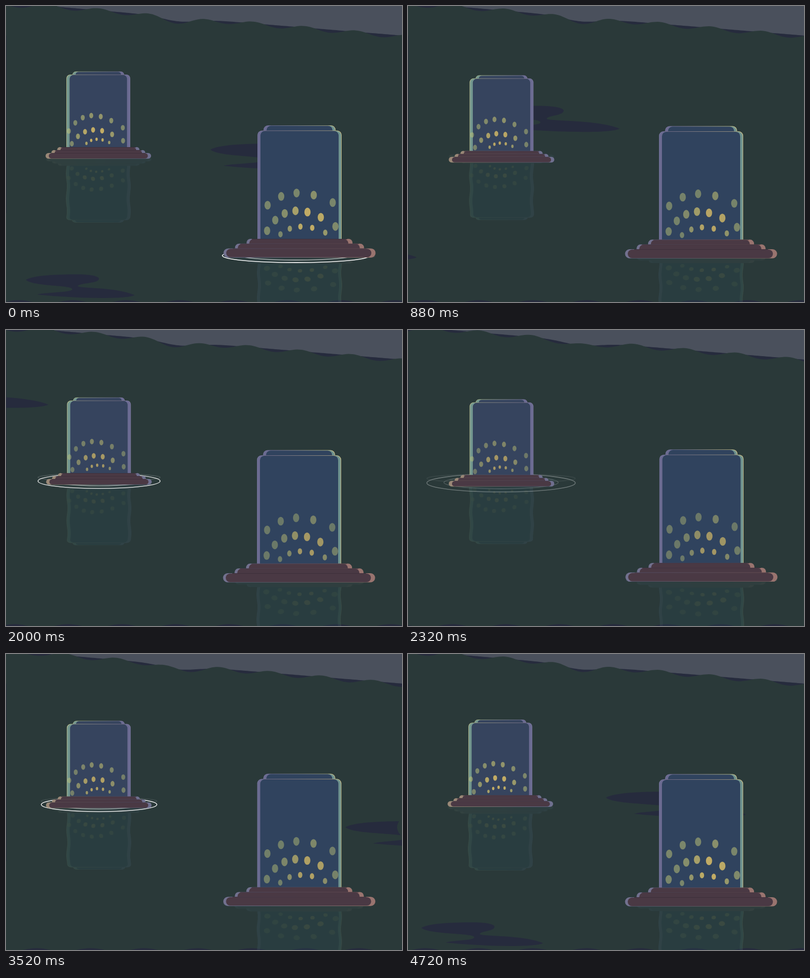
An HTML page with a canvas for the animation above (4800 ms loop, 800 px wide and 600 px high).

```html
<!DOCTYPE html>
<html lang="en">
<head>
<meta charset="utf-8">
<title>Floating lanterns</title>
<style>
  html, body { margin: 0; width: 100%; height: 100%; overflow: hidden; background: #262b3d; }
  canvas { display: block; width: 800px; height: 600px; }
</style>
</head>
<body>
<canvas id="stage" width="800" height="600"></canvas>
<script>
const LOOP = 4800, STEP = 80, TAU = Math.PI * 2;
const NIGHT = '#262b3d', LAKE = '#2a3939', SKY = '#4a505c', WOOD = '#4a3944';
const ctx = document.getElementById('stage').getContext('2d');
const mirror = document.createElement('canvas');
mirror.width = 800;
mirror.height = 600;
const mctx = mirror.getContext('2d');

const LANTERNS = [
  {
    x: 186.5, half: 64.5, top: 139, inset: 6.5, round: 8, glass: '#36445e',
    cap: { half: 52.5, h: 6.2 },
    foot: { half: 83, grow: 11.8, y: 286, rise: 6, thick: 11.5, ends: [6.5, 6.5] },
    rim: ['#73978f', '#6b6b92'], edge: ['#b4ba8c', '#77759a'],
    wood: ['#9a8877', '#6f708f'],
    arcs: [
      { n: 7, from: 127, to: 236, y: 222, drop: 28, size: 4 },
      { n: 7, from: 133, to: 236.5, y: 251, drop: 25, size: 4 },
      { n: 5, from: 162.5, to: 208.5, y: 270, drop: 7.5, size: 2.4 }
    ],
    glow: { x: 181, y: 259, reach: 46 },
    bob: { period: 1600, dx: 2.5, dy: 8 },
    mirror: { axis: 538.5, squash: .75 },
    ring: { x: 188, y: 303.3, r: 103.5, flat: .122, start: 160, period: 1600, life: 700, speed: .083 }
  },
  {
    x: 593, half: 85, top: 252.5, inset: 6, round: 9, glass: '#30435e',
    cap: { half: 72.7, h: 10.5 },
    foot: { half: 107, grow: 23.3, y: 472, rise: 9.7, thick: 18.5, ends: [5.5, 8.5] },
    rim: ['#6b6b91', '#6f938f'], edge: ['#73739a', '#cbc08a'],
    wood: ['#72718f', '#99746f'],
    arcs: [
      { n: 5, from: 528.5, to: 660, y: 379, drop: 22, size: 6.3 },
      { n: 7, from: 527.5, to: 665.5, y: 415, drop: 36, size: 6.3 },
      { n: 5, from: 554.5, to: 645, y: 447, drop: 14, size: 4.4 }
    ],
    glow: { x: 613, y: 432, reach: 58 },
    bob: { period: 1120, dx: -2.4, dy: 4.1 },
    mirror: { axis: 793.75, squash: .575 },
    ring: { x: 586, y: 506, r: 149, flat: .095, start: 0, period: 1200, life: 600, speed: .088 }
  }
];

const STREAKS = [
  { x: 400, y: 279, sx: 1.15, sy: 1.1 },
  { x: 27, y: 544, sx: 1, sy: 1 }
];

const clamp = v => Math.max(0, Math.min(1, v));
const bobAt = (L, t) => (1 - Math.cos(TAU * t / L.bob.period)) / 2;

function split(c, x, half, [left, right]) {
  const g = c.createLinearGradient(x - half, 0, x + half, 0);
  g.addColorStop(.12, left);
  g.addColorStop(.88, right);
  return g;
}

// A block centred on x with a coloured rim at both ends
function slab(c, x, half, y, h, radii, [l, r], rim, edge, fill) {
  c.beginPath();
  c.roundRect(x - half, y, half * 2, h, radii);
  c.fillStyle = split(c, x, half, edge);
  c.fill();
  c.beginPath();
  c.roundRect(x - half + 1, y + .7, half * 2 - 2, h - 1.2, radii);
  c.fillStyle = split(c, x, half, rim);
  c.fill();
  c.beginPath();
  c.roundRect(x - half + l, y + .8, half * 2 - l - r, h - 1.4, radii);
  c.fillStyle = fill;
  c.fill();
}

function lights(c, L, t) {
  const shimmer = .87 + .1 * Math.cos(TAU * t / LOOP);
  for (const arc of L.arcs) {
    const bend = .06 * arc.n - .08;
    for (let i = 0; i < arc.n; i++) {
      const k = i / (arc.n - 1);
      const x = arc.from + (arc.to - arc.from) * (k - bend * k * (1 - k));
      const y = arc.y + arc.drop * (2 * (k - .53)) ** 2;
      const warm = clamp(1.55 * (1 - Math.hypot(x - L.glow.x, y - L.glow.y) / L.glow.reach));
      c.fillStyle = `rgba(${190 + 14 * warm},${196 - 16 * warm},${119 - 17 * warm},${(.54 + .42 * warm) * shimmer})`;
      c.beginPath();
      c.ellipse(x, y, arc.size, arc.size * 1.4, 0, 0, TAU);
      c.fill();
    }
  }
}

function lantern(c, L, t, footAlpha) {
  const { cap, foot } = L;
  const corners = [L.round, L.round, 0, 0], ends = [L.inset, L.inset];
  slab(c, L.x, cap.half, L.top - cap.h, cap.h + 1, corners, ends, L.rim, L.edge, L.glass);
  slab(c, L.x, L.half, L.top, foot.y - L.top + 1, corners, ends, L.rim, L.edge, L.glass);
  c.fillStyle = 'rgba(110,100,110,.5)';
  c.fillRect(L.x - cap.half, L.top, cap.half * 2, .9);
  lights(c, L, t);

  c.globalAlpha = footAlpha;
  for (let i = 0; i < 3; i++) {
    const h = i < 2 ? foot.rise + 1 : foot.thick, half = foot.half + foot.grow * i;
    const y = foot.y + foot.rise * i, r = h * .75;
    slab(c, L.x, half, y, h, i < 2 ? [r, r, 0, 0] : h / 2, foot.ends, L.wood, L.wood, WOOD);
    c.fillStyle = '#3e303c';
    c.fillRect(L.x - half + h, y, half * 2 - h * 2, 1);
  }
  c.globalAlpha = 1;
}

function reflect(L, t) {
  const b = bobAt(L, t), { axis, squash } = L.mirror;
  mctx.setTransform(1, 0, 0, 1, 0, 0);
  mctx.clearRect(0, 0, 800, 600);
  mctx.setTransform(1, 0, 0, -squash, L.bob.dx * b, axis - .65 * L.bob.dy * b);
  lantern(mctx, L, t, .5);
  // Tint the image with the water
  mctx.setTransform(1, 0, 0, 1, 0, 0);
  mctx.globalCompositeOperation = 'source-atop';
  mctx.fillStyle = 'rgba(30,90,88,.45)';
  mctx.fillRect(0, 0, 800, 600);
  mctx.globalCompositeOperation = 'source-over';

  const from = Math.round(axis - squash * (L.foot.y + 36)) - 8;
  ctx.globalAlpha = .22;
  for (let y = from; y < Math.min(600, from + 170); y += 2) {
    ctx.drawImage(mirror, 0, y, 800, 2, Math.sin(y / 8 + TAU * t / 960), y, 800, 2);
  }
  ctx.globalAlpha = 1;
}

// Sloping shoreline with one soft bulge
const shore = x => Math.max(-1, .0865 * x - 7) + 8.5 * Math.exp(-(((x - 350) / 50) ** 2));

function area(upper, lower) {
  ctx.beginPath();
  for (let x = 0; x <= 800; x += 4) ctx.lineTo(x, upper(x));
  for (let x = 800; x >= 0; x -= 4) ctx.lineTo(x, lower(x));
  ctx.fill();
}

function scenery(t) {
  const turn = t / 960;
  ctx.fillStyle = NIGHT;
  ctx.fillRect(0, 0, 800, 600);
  ctx.fillStyle = SKY;
  area(() => -5, x => shore(x) - .5 - Math.max(0, (x - 400) / 220));
  ctx.fillStyle = LAKE;
  area(x => shore(x) - 4.6 * Math.cos(TAU * ((x - 187) / 104 + turn)),
    x => 599.7 - 3.4 * Math.cos(TAU * ((x - 26) / 108.5 + turn)));
  ctx.fillStyle = NIGHT;
  ctx.fillRect(0, 60, .8, 360);
}

function streak(S, t) {
  // Slow drift up to the loop's end, then a faster one with the lobes sliding apart
  const fast = t < LOOP / 2, left = 4720 - t;
  const x = S.x + (fast ? 13 - .305 * t : .238 * left);
  const y = S.y + (fast ? -.087 * t : .05 * left);
  const d = fast ? -26 * clamp(1 - t / 880) : 0, n = d / 2;
  const side = j => 10 * Math.cos((j - 12) / 40 * Math.PI);
  ctx.save();
  // The pond's swaying sides trim the streak
  ctx.beginPath();
  for (let j = -4; j <= 64; j += 4) ctx.lineTo(side(j), y + j);
  for (let j = 64; j >= -4; j -= 4) ctx.lineTo(800 - side(j), y + j);
  ctx.clip();
  ctx.translate(x, y);
  ctx.scale(S.sx, S.sy);
  ctx.beginPath();
  ctx.moveTo(0, 11);
  ctx.bezierCurveTo(15, 2, 60, 0, 105, 0);
  ctx.bezierCurveTo(135, 0, 152, 5, 147, 11);
  ctx.bezierCurveTo(144, 18, 118 + n, 18, 118 + n, 24);
  ctx.bezierCurveTo(125 + n, 29, 205 + d, 25, 246 + d, 42);
  ctx.bezierCurveTo(230 + d, 51, 130 + d, 49, 49 + d, 41);
  ctx.bezierCurveTo(62 + d, 36, 108 + n, 37, 107 + n, 30);
  ctx.bezierCurveTo(105 + n, 21, 15, 25, 0, 11);
  ctx.fillStyle = NIGHT;
  ctx.fill();
  ctx.restore();
}

function oval(x, y, rx, ry, alpha) {
  ctx.strokeStyle = `rgba(255,255,255,${alpha})`;
  ctx.lineWidth = 1.6;
  ctx.beginPath();
  ctx.ellipse(x, y, rx, ry, 0, 0, TAU);
  ctx.stroke();
}

function ripple({ x, y, r, flat, start, period, life, speed }, t) {
  const age = (t - start + period) % period;
  if (age >= life) return;
  const rx = r + speed * age, ry = rx * flat, cy = y + .012 * age;
  const alpha = 1 - (age / life) ** 1.6;
  oval(x, cy, rx, ry, alpha);
  oval(x, cy - 1, rx * .77, ry * .7, alpha * .6);
  oval(x, cy - ry / 2, rx, ry / 2, alpha * .25 * clamp(age / 300));
}

function render(t) {
  scenery(t);
  for (const S of STREAKS) streak(S, t);
  for (const L of LANTERNS) {
    const b = bobAt(L, t);
    reflect(L, t);
    ripple(L.ring, t);
    ctx.save();
    ctx.translate(L.bob.dx * b, L.bob.dy * b);
    lantern(ctx, L, t, 1);
    ctx.restore();
  }
}

const begin = performance.now();
let shown = -1;
function tick() {
  const t = Math.floor((performance.now() - begin) % LOOP / STEP) * STEP;
  if (t !== shown) render(shown = t);
  requestAnimationFrame(tick);
}
tick();
</script>
</body>
</html>
```
